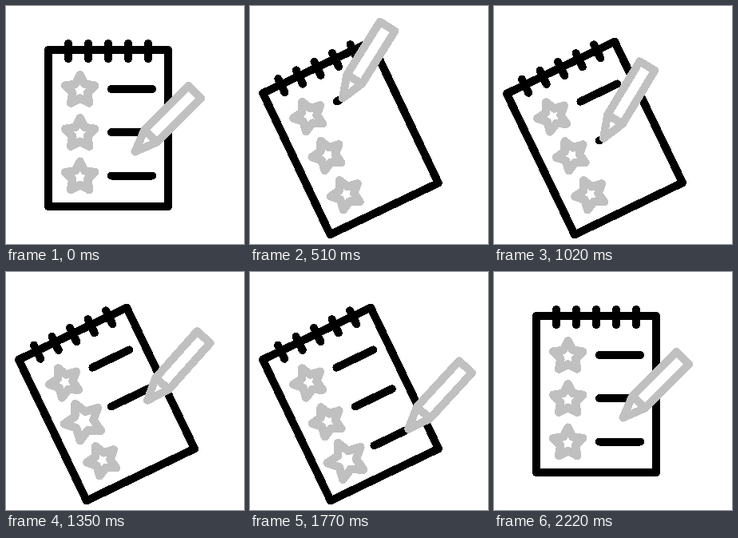
An HTML page for the animation above (2.25 s loop, 298 by 298 pixels).

```html
<!DOCTYPE html>
<html lang="en">
<head>
<meta charset="utf-8">
<title>Checklist</title>
<style>
  html, body { margin: 0; width: 100%; height: 100%; overflow: hidden; background: #fff; }
  svg { display: block; width: 100vw; height: 100vh; shape-rendering: crispEdges; }
  path { fill: none; stroke-linecap: round; stroke-linejoin: round; }
  .ink { stroke: #000; stroke-width: 10; }
  .star { stroke: #c0c0c0; }
  .pencil { stroke: #c0c0c0; stroke-width: 10; fill: #fff; }
</style>
</head>
<body>
<svg viewBox="0 0 298 298">
  <g id="pad">
    <path class="ink" d="M53 55H203V251H53Z"/>
    <path class="ink" d="M78 47V66M103 47V66M128 47V66M153 47V66M178 47V66"/>
  </g>
  <g id="pencil">
    <path class="pencil" d="M0 0L28 -11H106V11H28Z"/>
    <path class="pencil" d="M28 -11V11"/>
  </g>
</svg>
<script>
const LOOP = 2250;
const TILT = -25.7;
const PIVOT = '154.4 163.6';
const ROW_Y = [104, 158.2, 212.5];
const LEFT = 132, RIGHT = 183;
const FIRST = 492, PERIOD = 527, DRAW = 272;
const STAR_STROKE = 10.5;
const REST = { x: 161.5, y: 182.5, a: 45 };

const pad = document.getElementById('pad');
const pencil = document.getElementById('pencil');

const mix = (a, b, k) => a + (b - a) * k;
const span = (t, a, b) => Math.min(1, Math.max(0, (t - a) / (b - a)));
const sine = k => 0.5 - 0.5 * Math.cos(Math.PI * k);
const mixPose = (p, q, k) => ({ x: mix(p.x, q.x, k), y: mix(p.y, q.y, k), a: mix(p.a, q.a, k) });

function addPath(cls, d) {
  const el = document.createElementNS('http://www.w3.org/2000/svg', 'path');
  el.setAttribute('class', cls);
  el.setAttribute('d', d);
  pad.appendChild(el);
  return el;
}

function starPath(outer, inner) {
  const pts = [];
  for (let i = 0; i < 10; i++) {
    const r = i % 2 ? inner : outer;
    const a = i * Math.PI / 5;
    pts.push((r * Math.sin(a)).toFixed(2) + ' ' + (-r * Math.cos(a)).toFixed(2));
  }
  return 'M' + pts.join('L') + 'Z';
}

const rows = ROW_Y.map(y => ({
  y,
  line: addPath('ink', ''),
  star: addPath('star', starPath(19.5, 9.8))
}));

// Pencil pose at the two ends of each written line
const lineStart = i => ({ x: 112.8 + 24 * i, y: 117 + 49 * i, a: 59 });
const lineEnd = i => ({ x: 158 + 24 * i, y: 95 + 49 * i, a: 45 });

function pencilPose(t) {
  if (t < FIRST) {
    const k = span(t, 15, FIRST);
    return mixPose(REST, lineStart(0), sine(1 - Math.pow(1 - k, 1.85)));
  }
  const i = Math.min(2, Math.floor((t - FIRST) / PERIOD));
  const local = t - FIRST - i * PERIOD;
  if (local < DRAW) return mixPose(lineStart(i), lineEnd(i), local / DRAW);
  if (i < 2) return mixPose(lineEnd(i), lineStart(i + 1), span(local, DRAW, PERIOD));
  return mixPose(lineEnd(2), REST, sine(span(local, DRAW, 620)));
}

function render(t) {
  const tilt = sine(span(t, 75, 540)) - sine(span(t, 1800, 2215));
  pad.setAttribute('transform', `rotate(${TILT * tilt} ${PIVOT})`);

  const erased = sine(span(t, 15, 365));
  rows.forEach(({ y, line, star }, i) => {
    const begin = FIRST + i * PERIOD;
    const drawn = span(t, begin, begin + DRAW);
    const a = t < FIRST ? mix(LEFT, RIGHT, erased) : LEFT;
    const b = t < FIRST ? RIGHT : mix(LEFT, RIGHT, drawn);
    line.setAttribute('d', b > a ? `M${a} ${y}H${b}` : '');

    // The star grows while its outline keeps the same weight
    const beat = Math.sin(Math.PI * span(t, begin + 150, begin + 410));
    const size = 1 + 0.4 * beat * beat;
    star.setAttribute('transform', `translate(92.7 ${y + 1.7}) scale(${size})`);
    star.setAttribute('stroke-width', STAR_STROKE / size);
  });

  const p = pencilPose(t);
  pencil.setAttribute('transform', `translate(${p.x} ${p.y}) rotate(${-p.a})`);
}

const origin = performance.now();
function tick() {
  render((performance.now() - origin) % LOOP);
  requestAnimationFrame(tick);
}
render(0);
requestAnimationFrame(tick);
</script>
</body>
</html>
```
